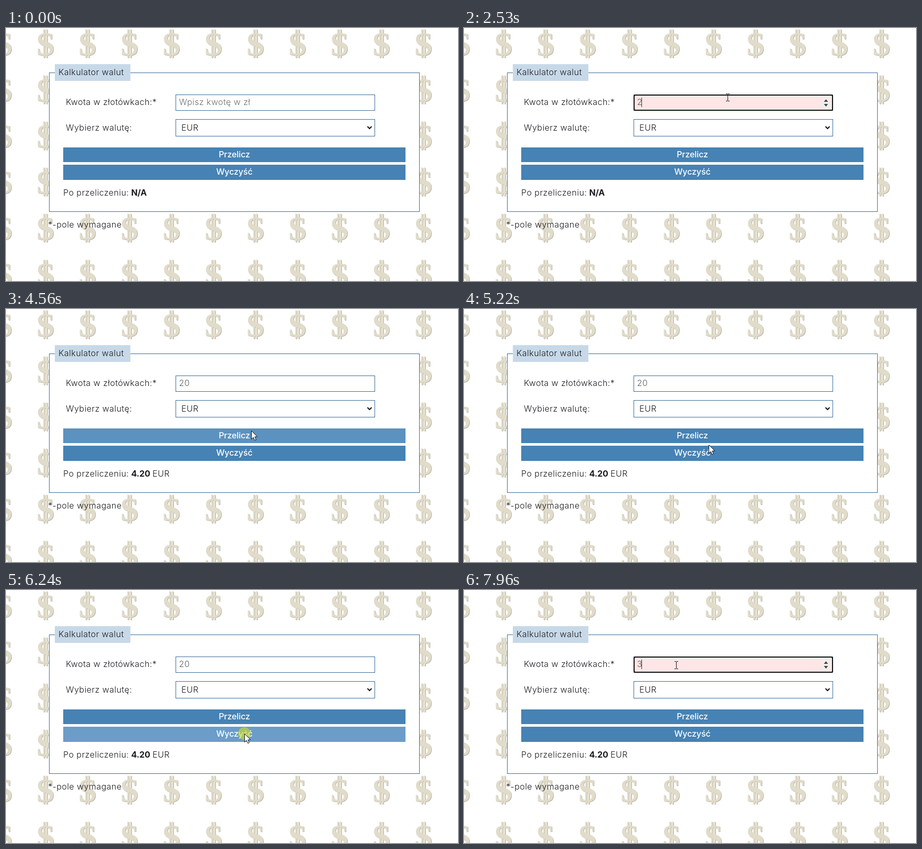
An HTML page with a canvas for the animation above (8000 ms loop, 861x483 px).

```html
<!DOCTYPE html>
<html lang="pl">
<head>
<meta charset="utf-8">
<title>Kalkulator walut</title>
<style>
  html, body { margin: 0; width: 100%; height: 100%; overflow: hidden; background: #fff; }
  canvas { display: block; width: 861px; height: 483px; }
</style>
</head>
<body>
<canvas id="stage"></canvas>
<script>
const W = 861, H = 483, LOOP = 8000;
const canvas = document.getElementById('stage');
const ratio = window.devicePixelRatio || 1;
canvas.width = Math.round(W * ratio);
canvas.height = Math.round(H * ratio);
const ctx = canvas.getContext('2d');
ctx.scale(ratio, ratio);

const INK = '#1b1b22', EDGE = '#3a6c98';
const BLUE = '#4682b4', HOVER = '#5b92bf', ACTIVE = '#6b9dc8';
const box = (x, y, w, h) => ({ x, y, w, h });
const PANEL = box(82, 85, 706, 266);
const FIELD = box(323, 127, 380, 31);
const SELECT = box(323, 174, 380, 33);
const CONVERT = box(109, 228, 652, 28);
const CLEAR = box(109, 261, 652, 29);

const RATE = 0.21, MINIMUM = 20;
const STEP = 68, HELD = 130, BLINK = 530;

const HOME = { x: 829, y: 470 };
const TRIPS = [
  { start: 70, end: 550, x: 502, y: 132 },
  { start: 3810, end: 4350, x: 467, y: 232 },
  { start: 5090, end: 5430, x: 465, y: 314 },
  { start: 5490, end: 5840, x: 454, y: 274 },
  { start: 6440, end: 7030, x: 404, y: 143 }
];
const EVENTS = [
  { at: 810 }, { at: 2530, key: '2' }, { at: 2930, key: '0' },
  { at: 4420 }, { at: 6240 }, { at: 7100 }, { at: 7960, key: '3' }
];

const inside = (p, b) =>
  p && p.x >= b.x && p.x < b.x + b.w && p.y >= b.y && p.y < b.y + b.h;

// The pointer jumps along straight lines in even steps.
function pointerAt(t) {
  const i = TRIPS.filter(trip => t >= trip.start).length - 1;
  if (i < 0) return null;
  const from = TRIPS[i - 1] || HOME, to = TRIPS[i];
  const steps = Math.round((to.end - to.start) / STEP) + 1;
  const pace = (to.end - to.start) / (steps - 1);
  const k = Math.min(1, (1 + Math.floor((t - to.start) / pace + 1e-6)) / steps);
  return {
    x: Math.round(from.x + (to.x - from.x) * k),
    y: Math.round(from.y + (to.y - from.y) * k)
  };
}

// Replays all clicks and keys up to time t.
function stateAt(t) {
  const s = { pointer: pointerAt(t), value: '', result: null, focused: false, pressed: false };
  let lastInput = 0;
  for (const { at, key } of EVENTS.filter(e => t >= e.at)) {
    if (key) {
      s.value += key;
      lastInput = at;
      continue;
    }
    const spot = pointerAt(at);
    s.focused = inside(spot, FIELD);
    s.pressed = t < at + HELD;
    if (s.focused) lastInput = at;
    if (!s.pressed && inside(spot, CONVERT)) s.result = (s.value * RATE).toFixed(2);
    if (!s.pressed && inside(spot, CLEAR)) s.value = '';
  }
  s.caret = s.focused && Math.floor((t - lastInput) / BLINK) % 2 === 0;
  s.invalid = s.value !== '' && s.value < MINIMUM;
  return s;
}

function rect(color, x, y, w, h) {
  ctx.fillStyle = color;
  ctx.fillRect(x, y, w, h);
}

function frame({ x, y, w, h }) {
  rect('#fff', x, y, w, h);
  ctx.strokeStyle = EDGE;
  ctx.lineWidth = 1;
  ctx.strokeRect(x + 0.5, y + 0.5, w - 1, h - 1);
}

function text(str, x, y, { color = INK, weight = 300, align = 'left' } = {}) {
  ctx.font = `${weight} 16px Inter, sans-serif`;
  ctx.letterSpacing = weight < 400 ? '0.45px' : '-0.1px';
  ctx.textAlign = align;
  ctx.fillStyle = color;
  ctx.fillText(str, x, y);
}

function shape(points, fill) {
  ctx.beginPath();
  points.forEach(([x, y]) => ctx.lineTo(x, y));
  ctx.closePath();
  ctx.fillStyle = fill;
  ctx.fill();
}

function dollar(x, y, color) {
  ctx.fillStyle = color;
  ctx.fillText('S', x, y + 22);
  ctx.fillRect(x - 4, y - 27, 3, 54);
  ctx.fillRect(x + 1, y - 27, 3, 54);
}

function wallpaper() {
  ctx.font = 'bold 64px "Liberation Serif", serif';
  ctx.letterSpacing = '0px';
  ctx.textAlign = 'center';
  for (let y = 29.5; y < H + 30; y += 88) {
    for (let x = -5; x < W; x += 80) {
      dollar(x + 1, y + 1, '#bab6a6');
      dollar(x, y, '#e1dcca');
    }
  }
}

function spinner(x, y) {
  rect('#efefef', x - 7, y - 9, 15, 18);
  for (const dir of [-1, 1]) {
    shape([[x - 4, y + 2 * dir], [x, y + 7 * dir], [x + 4, y + 2 * dir]], '#444');
  }
}

function amountField(s) {
  const { x, y, w, h } = FIELD;
  frame(FIELD);
  if (s.invalid) rect('#ffe6e6', x + 1, y + 1, w - 2, h - 2);
  if (s.focused) {
    ctx.strokeStyle = '#101010';
    ctx.lineWidth = 2;
    ctx.beginPath();
    ctx.roundRect(x + 1, y + 1, w - 2, h - 2, 2.5);
    ctx.stroke();
  }
  text(s.value || 'Wpisz kwotę w zł', 329.5, 147, { color: s.value ? '#5c5c5c' : '#6f6f6f' });
  if (s.caret) rect('#333', Math.floor(329 + s.value.length * 9.5), 133, 1, 18);
  if (s.focused || inside(s.pointer, FIELD)) spinner(689.5, 143);
}

function currencySelect() {
  frame(SELECT);
  text('EUR', 334, 196);
  ctx.strokeStyle = '#111';
  ctx.lineWidth = 2;
  ctx.beginPath();
  ctx.moveTo(688.5, 188);
  ctx.lineTo(692.5, 192);
  ctx.lineTo(696.5, 188);
  ctx.stroke();
}

function button(label, b, { pointer, pressed }) {
  const color = !inside(pointer, b) ? BLUE : pressed ? ACTIVE : HOVER;
  rect(color, b.x, b.y, b.w, b.h);
  text(label, b.x + b.w / 2, b.y + 19, { color: '#fff', weight: 500, align: 'center' });
}

function resultLine(result) {
  text('Po przeliczeniu:', 109, 320);
  text(result || 'N/A', 238.5, 320, { weight: 700 });
  if (result) text('EUR', 279, 320);
}

function arrow({ x, y }) {
  ctx.save();
  ctx.translate(x + 0.5, y + 0.5);
  shape([[0, 0], [0, 16], [3.6, 12.6], [6.2, 18.2], [8.8, 17], [6.3, 11.6], [11.2, 11.3]], '#fff');
  ctx.strokeStyle = '#111';
  ctx.lineWidth = 1;
  ctx.stroke();
  ctx.restore();
}

function beam({ x, y }) {
  rect('#111', x, y - 6, 1, 13);
  for (const edge of [y - 7, y + 7]) {
    rect('#111', x - 3, edge, 3, 1);
    rect('#111', x + 1, edge, 3, 1);
  }
}

function cursor({ pointer, pressed }) {
  if (!pointer) return;
  if (pressed) {
    ctx.fillStyle = 'rgba(208, 218, 40, 0.62)';
    ctx.beginPath();
    ctx.arc(pointer.x, pointer.y, 12, 0, Math.PI * 2);
    ctx.fill();
  }
  (inside(pointer, FIELD) ? beam : arrow)(pointer);
}

function draw(t) {
  const s = stateAt(t);
  rect('#fff', 0, 0, W, H);
  wallpaper();
  frame(PANEL);
  rect('#c7d9e8', 93, 69, 144, 32);
  text('Kalkulator walut', 100, 90);
  text('Kwota w złotówkach:*', 114, 147);
  text('Wybierz walutę:', 114, 196);
  amountField(s);
  currencySelect();
  button('Przelicz', CONVERT, s);
  button('Wyczyść', CLEAR, s);
  resultLine(s.result);
  text('*-pole wymagane', 80, 381);
  cursor(s);
}

const began = performance.now();
function tick() {
  draw((performance.now() - began) % LOOP);
  requestAnimationFrame(tick);
}
tick();
</script>
</body>
</html>
```
